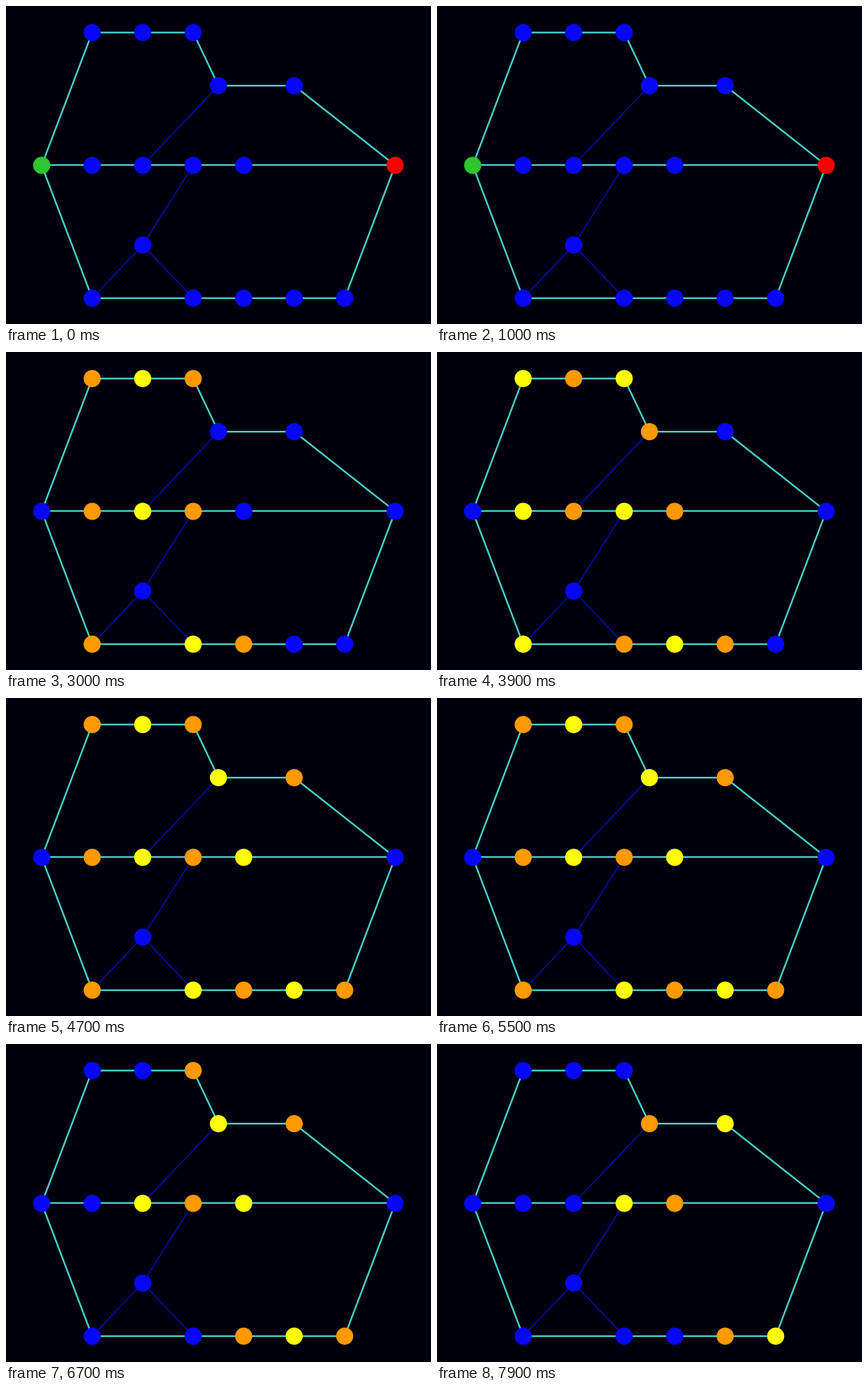
A matplotlib script for the animation above (8000 ms loop, 600 by 448 pixels).

```python
import matplotlib.pyplot as plt
from matplotlib.animation import FuncAnimation
from matplotlib.patches import Circle

W, H, DPI = 600, 448, 100
STEP_MS, FRAMES = 100, 80
FIRST_MOVE, TURN = 17, 10  # in ticks of STEP_MS

BACK, CYAN, LINK = "#00000d", "#48d1cc", "#0a08b4"
BLUE, ORANGE, YELLOW = "#0606ff", "#ff9900", "#ffff00"
GREEN, RED = "#2dc62d", "#ff0000"

START, END = (0, 5), (7, 5)
# Rooms of each route between start and end, in grid cells
ROUTES = [
    [(1, 0), (2, 0), (3, 0), (3.5, 2), (5, 2)],
    [(1, 5), (2, 5), (3, 5), (4, 5)],
    [(1, 10), (3, 10), (4, 10), (5, 10), (6, 10)],
]
ANTS = [5, 6, 5]
SIDE_ROOM = (2, 8)
SIDE_LINKS = [((3.5, 2), (2, 5)), ((3, 5), SIDE_ROOM),
              (SIDE_ROOM, (1, 10)), (SIDE_ROOM, (3, 10))]


def place(cell):
    col, row = cell
    return 299.9 + (col - 3.5) * 71.29, 224.5 + (row - 5) * 37.42


fig = plt.figure(figsize=(W / DPI, H / DPI), dpi=DPI, facecolor=BACK)
ax = fig.add_axes([0, 0, 1, 1])
ax.set_xlim(0, W)
ax.set_ylim(H, 0)
ax.axis("off")


def draw_path(cells, color, px):
    xs, ys = zip(*map(place, cells))
    ax.plot(xs, ys, color=color, lw=px * 72 / DPI, zorder=1)


def add_room(cell):
    return ax.add_patch(Circle(place(cell), 12.1, fc=BLUE, lw=0, zorder=2))


for link in SIDE_LINKS:
    draw_path(link, LINK, 1.5)
for route in ROUTES:
    draw_path([START, *route, END], CYAN, 2.4)

start, end = add_room(START), add_room(END)
add_room(SIDE_ROOM)
rooms = [[add_room(cell) for cell in route] for route in ROUTES]


def room_color(turn, index, ants):
    ant = turn - index
    if turn == 0 or not 1 <= ant <= ants:
        return BLUE
    return ORANGE if ant % 2 else YELLOW


def update(tick):
    # Two ants are already on each route when the march appears
    turn = 0 if tick < FIRST_MOVE else 2 + (tick - FIRST_MOVE) // TURN
    start.set_facecolor(BLUE if turn else GREEN)
    end.set_facecolor(BLUE if turn else RED)
    for route, ants in zip(rooms, ANTS):
        for index, room in enumerate(route):
            room.set_facecolor(room_color(turn, index, ants))
    return [start, end, *sum(rooms, [])]


anim = FuncAnimation(fig, update, frames=FRAMES, interval=STEP_MS,
                     repeat=True, repeat_delay=0, blit=False)
plt.show()
```
